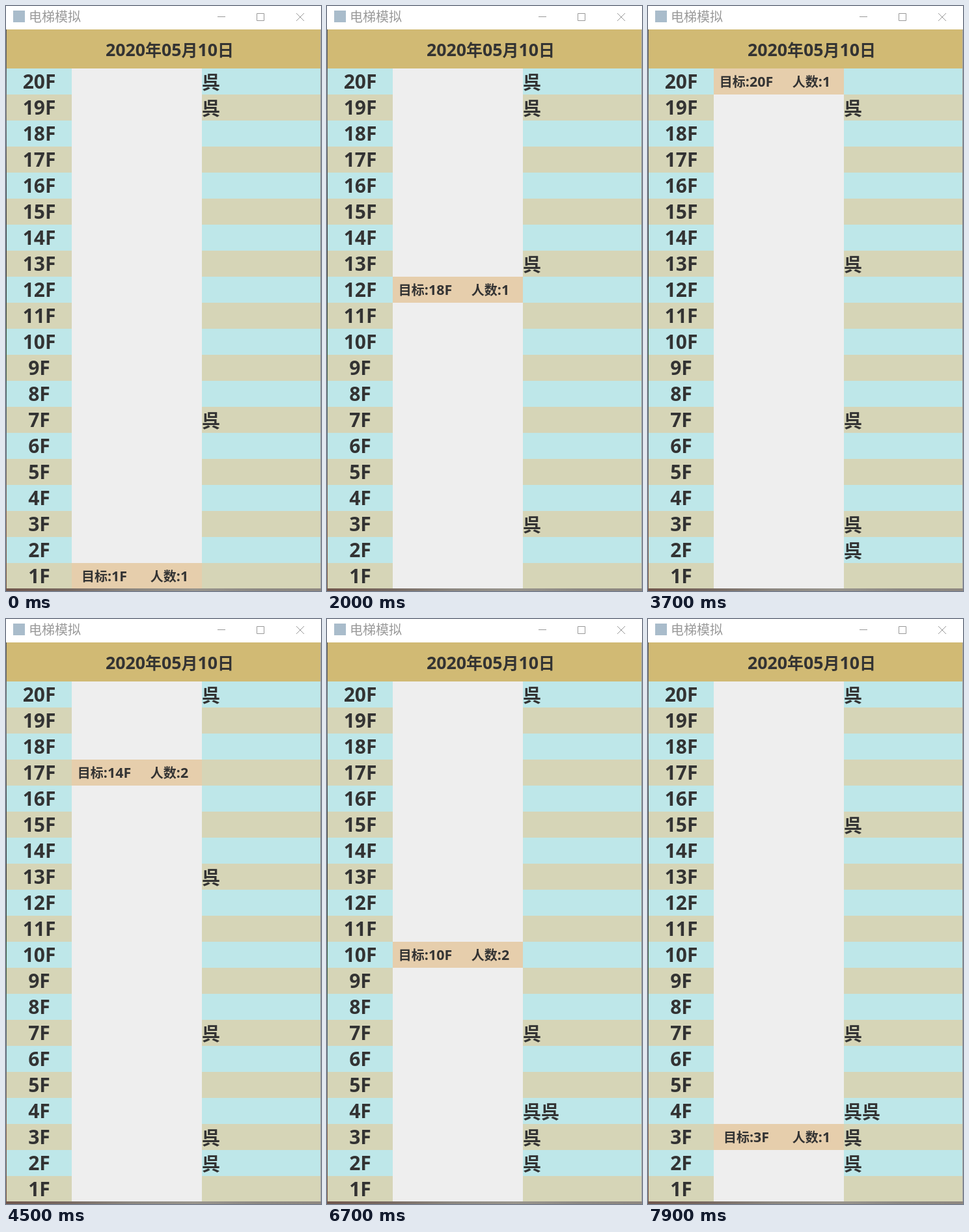
These frames come from a looping animation (484x899 px, 8000 ms). An HTML page with a canvas:

```html
<!DOCTYPE html>
<html lang="zh">
<head>
<meta charset="utf-8">
<title>电梯模拟</title>
<style>
  html, body { margin: 0; width: 100%; height: 100%; overflow: hidden; background: #eee; }
  canvas { display: block; }
</style>
</head>
<body>
<canvas id="stage" width="484" height="899"></canvas>
<script>
const ctx = document.getElementById('stage').getContext('2d');
const LOOP = 8000, TICK = 100, ROW = 40, SPEED = 0.4;
const LATIN = '"Open Sans", sans-serif', HAN = '"Noto Sans CJK SC", "Noto Sans CJK", sans-serif';
const LEAVE = '离开电梯', ENTER = '进入电梯';

// [departure time, from floor, to floor]
const trips = [
  [100, 1, 7], [1060, 7, 9], [1700, 9, 18], [2960, 18, 20], [3850, 20, 19],
  [4300, 19, 14], [5280, 14, 13], [6160, 13, 10], [6780, 10, 8], [7400, 8, 3]
];
// [time, text]; a number means a target floor
const status = [
  [0, 1], [200, 7], [1200, 9], [1400, LEAVE], [1800, 18], [2700, LEAVE], [3000, 20],
  [3900, 19], [4400, 14], [4900, LEAVE], [6200, 10], [6800, 8], [7100, LEAVE], [7500, 3]
];
// [time, text]; a number means a head count
const load = [
  [0, 1], [800, ENTER], [1100, 2], [1600, 1], [2900, 0], [3500, ENTER], [3700, 1],
  [4100, ENTER], [4300, 2], [5100, 1], [5800, 0], [5900, ENTER], [6200, 1],
  [6500, ENTER], [6700, 2], [7300, 1]
];
// [floor, from, to]
const exits = [[9, 1400, 1600], [18, 2700, 2900], [14, 4900, 5100], [13, 5700, 5800], [8, 7100, 7300]];
const waiting = [
  [20, 0, 3500], [20, 4000, LOOP], [19, 0, 4100], [7, 0, 800], [7, 3300, LOOP],
  [13, 500, 5900], [3, 1200, LOOP], [2, 2200, LOOP], [4, 4600, LOOP],
  [10, 5700, 6500], [4, 6700, LOOP], [15, 7700, LOOP]
];

const floorY = floor => 96 + (20 - floor) * ROW;
const latest = (list, t) => list.filter(item => item[0] <= t).pop();
const during = (list, t) => list.filter(([, from, to]) => t >= from && t < to);

function rect(color, x, y, w, h) {
  ctx.fillStyle = color;
  ctx.fillRect(x, y, w, h);
}

// Latin runs are set slightly larger than Han runs to balance the two fonts.
function text(str, x, y, size, { align = 0.5, color = '#333', weight = 'bold' } = {}) {
  const runs = str.match(/[\x00-\x7f]+|[^\x00-\x7f]+/g).map(run => {
    const latin = run.charCodeAt(0) < 128;
    const font = `${weight} ${latin ? size * 15 / 14 : size}px ${latin ? LATIN : HAN}`;
    ctx.font = font;
    return { run, font, width: ctx.measureText(run).width };
  });
  x -= align * runs.reduce((sum, r) => sum + r.width, 0);
  ctx.fillStyle = color;
  for (const r of runs) {
    ctx.font = r.font;
    ctx.fillText(r.run, x, y);
    x += r.width;
  }
}

function gradient(x, y, w, h, colors) {
  const fill = ctx.createLinearGradient(x, y, w > h ? x + w : x, w > h ? y : y + h);
  colors.forEach((c, i) => fill.addColorStop(i / (colors.length - 1), c));
  rect(fill, x, y, w, h);
}

function drawWindow() {
  rect('#eee', 0, 0, 484, 899);
  gradient(0, 36, 1, 863, ['#555', '#777', '#444', '#333', '#3a5a3a', '#567', '#865', '#754']);
  gradient(483, 36, 1, 863, ['#aaa', '#888', '#999', '#aaa']);
  gradient(0, 895, 484, 4, ['#70564c', '#786a62', '#8c8780', '#99958d', '#8d8983', '#8f8880']);
  rect('#fff', 0, 0, 484, 36);
  rect('#a9bccb', 11, 7, 18, 18);
  text('电梯模拟', 35, 24, 20, { align: 0, color: '#999', weight: 'normal' });

  ctx.strokeStyle = '#999';
  ctx.lineWidth = 1;
  ctx.beginPath();
  ctx.moveTo(325, 16.5); ctx.lineTo(337, 16.5);
  ctx.rect(385.5, 11.5, 11, 11);
  ctx.moveTo(446, 11); ctx.lineTo(458, 23);
  ctx.moveTo(458, 11); ctx.lineTo(446, 23);
  ctx.stroke();

  rect('#d1ba74', 1, 36, 482, 60);
  text('2020年05月10日', 251.5, 77, 25);
}

function drawFloors(t) {
  const red = during(exits, t).map(([floor]) => floor);
  const people = during(waiting, t);
  for (let floor = 20; floor >= 1; floor--) {
    const y = floorY(floor), h = floor === 1 ? 39 : ROW;
    const color = floor % 2 ? '#d6d5b7' : '#bee7e9';
    rect(red.includes(floor) ? '#f4606c' : color, 1, y, 100, h);
    rect(color, 301, y, 182, h);
    text(floor + 'F', 51, y + 31, 28);
    const queue = people.filter(p => p[0] === floor).length;
    if (queue) text('呉'.repeat(queue), 301, y + 31.5, 28, { align: 0 });
  }
}

function drawCabin(t) {
  const [start, from, to] = latest(trips, t) || trips[0];
  const moved = Math.min(Math.max(0, t - start) * SPEED, Math.abs(to - from) * ROW);
  const y = floorY(from) - Math.sign(to - from) * moved;
  const left = latest(status, t)[1], right = latest(load, t)[1];
  rect('#e6ceac', 101, y, 200, Math.min(ROW, 895 - y));
  text(left === LEAVE ? left : `目标:${left}F`, 151, y + 28, 20);
  text(right === ENTER ? right : `人数:${right}`, 251, y + 28, 20);
}

function frame() {
  const t = Math.floor(performance.now() % LOOP / TICK) * TICK;
  drawWindow();
  drawFloors(t);
  drawCabin(t);
  requestAnimationFrame(frame);
}
frame();
</script>
</body>
</html>
```
